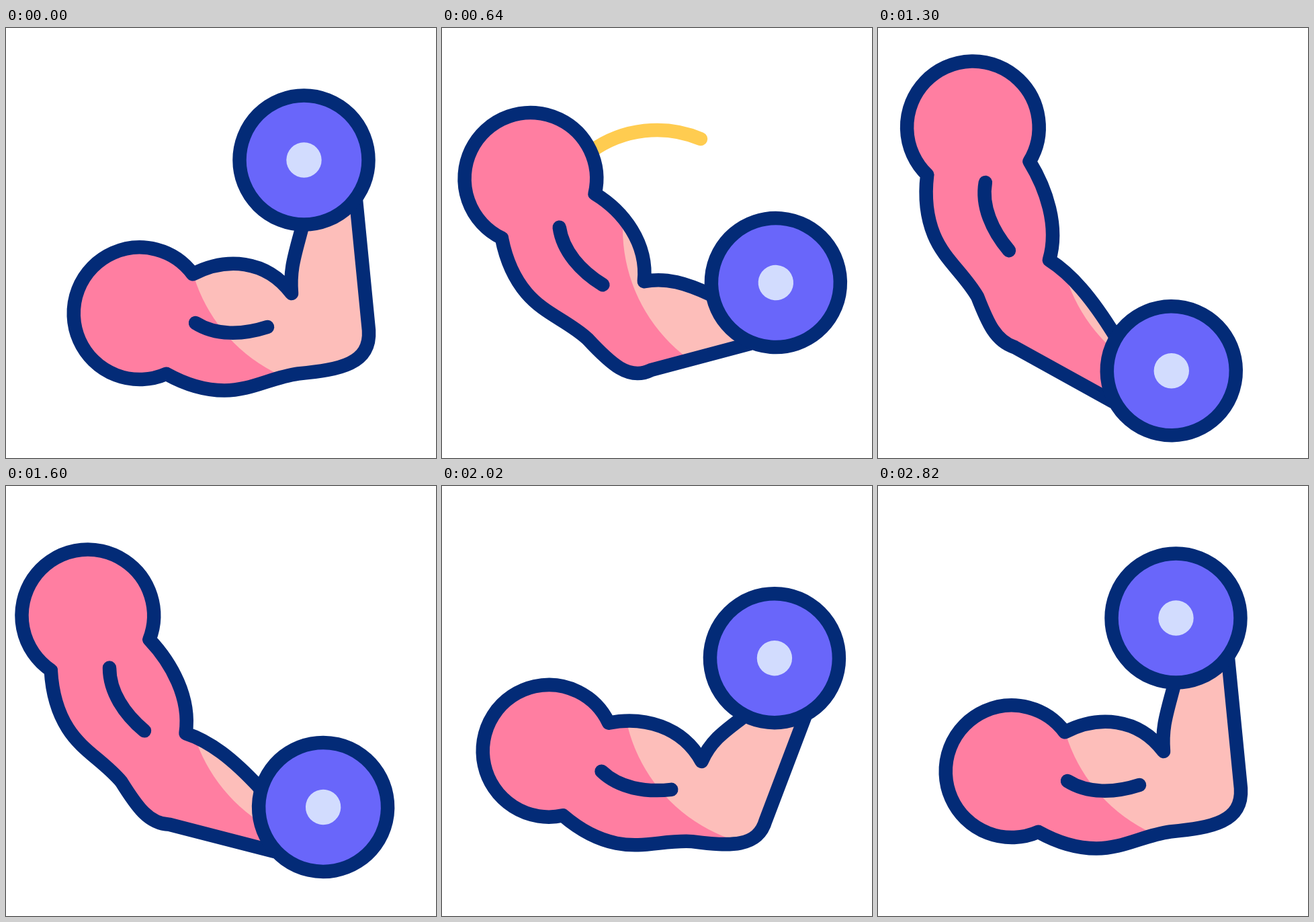
Write an HTML page with a canvas that moves like this. It is 640x640 px and loops after 3.6 s.

```html
<!DOCTYPE html>
<html>
<head>
<meta charset="utf-8">
<style>
html, body { margin: 0; height: 100%; overflow: hidden; background: #fff; }
canvas { display: block; }
</style>
</head>
<body>
<canvas id="stage" width="640" height="640"></canvas>
<script>
const ctx = document.getElementById('stage').getContext('2d');
const LOOP = 3600, LOWERED = 1200, RAISED = 2820;
const LINE = 20.5, RAD = Math.PI / 180;
const NAVY = '#032b77', PINK = '#ff7ea1', PEACH = '#fdbeba',
      VIOLET = '#6966fa', PALE = '#d2dcfe', YELLOW = '#ffcc50';
const HAND = { x: 443.5, y: 196.5 };

const clamp = (v, lo, hi) => Math.min(hi, Math.max(lo, v));
const mix = (a, b, k) => a + (b - a) * k;

// Same as CSS cubic-bezier(x1, 0, x2, 1)
function ease(k, x1, x2) {
  let lo = 0, hi = 1;
  for (let i = 0; i < 24; i++) {
    const u = (lo + hi) / 2, v = 1 - u;
    if (3 * u * v * (v * x1 + u * x2) + u ** 3 < k) lo = u; else hi = u;
  }
  return lo * lo * (3 - 2 * lo);
}

// Goes from 0 to 1 while the arm is lowered, then back to 0
function swing(t, down, up) {
  return t < LOWERED
    ? ease(t / LOWERED, ...down)
    : 1 - ease(clamp((t - LOWERED) / (RAISED - LOWERED), 0, 1), ...up);
}

function pose(t) {
  const turn = swing(t, [.75, .17], [.54, .05]);
  const reach = swing(t, [.72, .34], [.58, .21]);
  const drop = swing(t, [.75, .17], [.58, .17]);
  const bow = t < LOWERED ? 23 * Math.sin(Math.PI * (turn + reach) / 2) ** 2 : 0;
  return { angle: 68 * turn * RAD, m: 1.054 * reach, dx: 2 * drop + bow, dy: 91 * drop };
}

function armPath(m, weight) {
  const p = new Path2D();
  const curve = (from, to) => p.bezierCurveTo(...from.map((n, i) => mix(n, to[i], m)));
  const rim = deg => [weight.x + 98.5 * Math.cos(deg * RAD), weight.y + 98.5 * Math.sin(deg * RAD)];

  p.moveTo(...rim(mix(38, 82.5, m)));
  p.lineTo(mix(540, 526, m), mix(450, 490, m));
  curve([543, 500, 498, 508.5, 435, 514.5], [508, 514, 478, 515, 435, 514.5]);
  p.bezierCurveTo(395, 520, 365, 539.5, 325, 539.5);
  p.bezierCurveTo(295, 539.5, 266, 530, 239, 515);
  p.arc(199, 424.8, 98.3, 66.1 * RAD, -36.5 * RAD);
  curve([327, 341, 387, 344, 425, 395], [324, 358, 384, 361, 425, 395]);
  p.bezierCurveTo(mix(422, 455, m), mix(358, 372, m), mix(430, 497, m), mix(338, 357, m),
    ...rim(mix(91.4, 141.6, m)));
  return p;
}

function disc(x, y, r, fill) {
  ctx.beginPath();
  ctx.arc(x, y, r, 0, 7);
  ctx.fillStyle = fill;
  ctx.fill();
}

function swoosh(t) {
  const angle = time => clamp(-67.5 + .257 * (time - 640), -140, 50);
  const end = angle(t), start = angle(t - 227);
  if (end <= start) return;
  ctx.beginPath();
  ctx.arc(320, 320, 168, start * RAD, end * RAD);
  ctx.strokeStyle = YELLOW;
  ctx.stroke();
}

function draw(t) {
  const { angle, m, dx, dy } = pose(t);
  const weight = { x: HAND.x + 193.5 * m, y: HAND.y + 88.5 * m };

  ctx.setTransform(1, 0, 0, 1, 0, 0);
  ctx.fillStyle = '#fff';
  ctx.fillRect(0, 0, 640, 640);
  ctx.lineWidth = LINE;
  ctx.lineCap = ctx.lineJoin = 'round';
  swoosh(t);

  ctx.translate(HAND.x + dx, HAND.y + dy);
  ctx.rotate(angle);
  ctx.translate(-HAND.x, -HAND.y);
  const arm = armPath(m, weight);
  ctx.fillStyle = PINK;
  ctx.fill(arm);

  // The light area stays still while the arm moves through it
  ctx.save();
  ctx.clip(arm);
  ctx.setTransform(1, 0, 0, 1, 0, 0);
  disc(509, 299, 240, PEACH);
  ctx.restore();

  ctx.strokeStyle = NAVY;
  ctx.stroke(arm);
  ctx.beginPath();
  ctx.moveTo(282, 439);
  ctx.bezierCurveTo(312, 458, 352, 457, 389, 445);
  ctx.stroke();

  disc(weight.x, weight.y, 96, VIOLET);
  ctx.stroke();
  disc(weight.x, weight.y, 26.2, PALE);
}

function frame() {
  draw(performance.now() % LOOP);
  requestAnimationFrame(frame);
}
frame();
</script>
</body>
</html>
```
